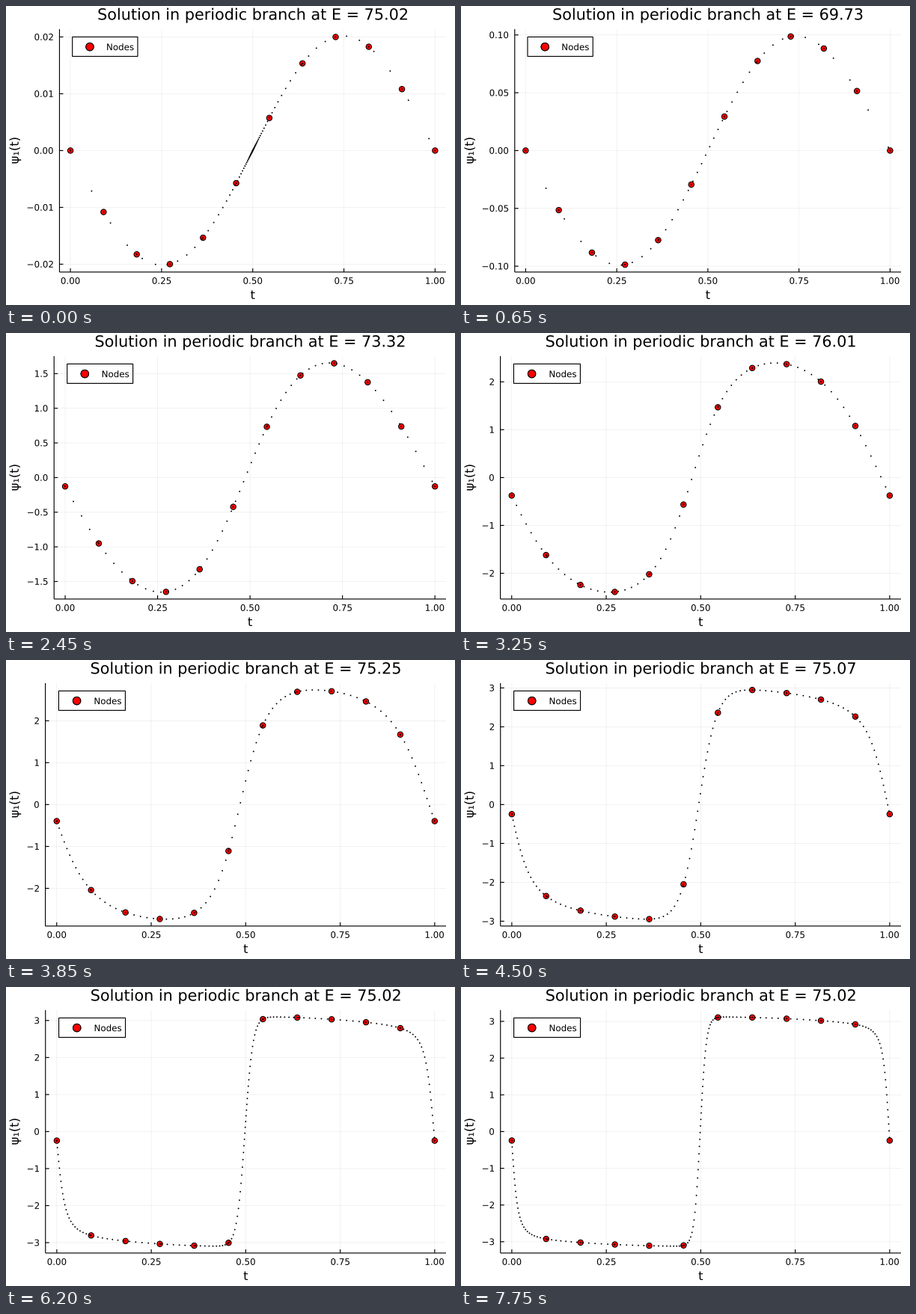
Animation, 600 px wide and 400 px high, one loop 7.8 s. Source, as a matplotlib script:

```python
import numpy as np
import matplotlib.pyplot as plt
from matplotlib.animation import FuncAnimation
from matplotlib.collections import LineCollection
from matplotlib.patches import PathPatch, Rectangle
from matplotlib.textpath import TextPath
from matplotlib.transforms import Affine2D

plt.rcParams["font.family"] = "DejaVu Sans"

W, H, FRAMES = 600, 400, 156
PT = 0.72                                  # points per pixel at 100 dpi
RIGHT, TOP, BOTTOM = 588.0, 30.9, 355.9
MID = (TOP + BOTTOM) / 2
SMALL, LABEL, TITLE = 11.87, 16.3, 20.76   # font sizes in pixels
NODES = np.arange(12) / 11
GRID = np.linspace(0, 1, 6001)

# frame: amplitude, start steepness, plateau tilt, middle steepness,
#        tanh share, phase shift, point clustering in the middle, at the ends
POSES = {
    0:   (0.02017, 1.00, 0.000, 1.02, 0, 0.0000, 0.004, 5.000),
    13:  (0.0991, 1.04, 0.000, 1.15, 0, 0.0000, 0.085, 3.000),
    32:  (0.8130, 1.10, 0.000, 1.30, 0, 0.0014, 0.092, 0.600),
    65:  (2.3940, 1.88, 0.000, 2.80, 0, 0.0225, 0.085, 0.115),
    90:  (2.9470, 5.75, 0.160, 6.60, 1, 0.0054, 0.028, 0.027),
    124: (3.0950, 13.4, 0.105, 15.0, 1, 0.0021, 0.008, 0.0125),
    155: (3.1200, 18.6, 0.075, 20.0, 1, 0.00145, 0.0068, 0.008),
}
LOG = [0, 1, 3, 6, 7]                      # columns blended on a log scale
TIMES = np.array(list(POSES), float)
TABLE = np.array(list(POSES.values()))
TABLE[:, LOG] = np.log(TABLE[:, LOG])


def hermite(s, a, b, da, db):
    return (a + (b - a) * s * s * (3 - 2 * s)
            + da * s * (1 - s) ** 2 - db * s * s * (1 - s))


def tangents():
    d = np.diff(TABLE, axis=0) / np.diff(TIMES)[:, None]
    same = d[:-1] * d[1:] > 0
    total = np.where(same, d[:-1] + d[1:], 1)
    inner = np.where(same, 2 * d[:-1] * d[1:] / total, 0)
    return np.vstack([d[:1], inner, d[-1:] * 0.7])


SLOPES = tangents()


def pose(f):
    i = min(np.searchsorted(TIMES, f, side="right") - 1, len(TIMES) - 2)
    h = TIMES[i + 1] - TIMES[i]
    p = hermite((f - TIMES[i]) / h, TABLE[i], TABLE[i + 1],
                h * SLOPES[i], h * SLOPES[i + 1])
    p[LOG] = np.exp(p[LOG])
    return p


def energy(f):
    if f <= 32:
        return 69.12 + 5.9 * np.exp(-0.175 * f) + 0.009 * (f / 32) ** 2
    if f < 65:
        return hermite((f - 32) / 33, 69.15, 76.01, 0.7, -3.9)
    return 75.02 + 0.99 * np.exp(-0.12 * (f - 65))


def curve(t, p):
    amp, start, tilt, middle, share, shift = p[:6]

    def lobe(u):
        x = start * np.tan(np.pi * np.clip(u, 0, 0.499999))
        y = middle * np.tan(np.pi * np.clip(0.5 - u, 0, 0.499999))
        rise = x / np.hypot(1, x) * (1 - tilt * (1 - 2 * u) ** 2)
        return rise * ((1 - share) * y / np.hypot(1, y) + share * np.tanh(y))

    peak = lobe(np.linspace(0, 0.5, 1001)).max()
    w = (t + shift) % 1
    return amp / peak * np.where(w < 0.5, -lobe(w), lobe(1 - w))


def steps(p):
    """Solver steps: close together where the motion is fast."""
    mid, end = p[6:]
    v = np.abs(GRID - 0.5)
    rho = (1 / np.hypot(v, mid) + 1 / np.hypot(0.5 - v, end)) / 0.135
    s = np.concatenate([[0], np.cumsum((rho[1:] + rho[:-1]) / 2 * GRID[1])])
    return np.concatenate([np.interp(np.arange(int(s[-1]) + 1), s, GRID), NODES])


def y_ticks(limit):
    best, out = -1, None
    for z in range(-4, 2):
        for q, nice in ((1, 1), (5, 0.9), (2, 0.7), (2.5, 0.5), (3, 0.2)):
            step = q * 10.0 ** z
            k = int(limit / step)
            if k not in (2, 3):
                continue
            score = (1 - abs(2 * k - 4) / 5) / 4 + limit / (2 * k * step) + nice / 4
            if score > best:
                digits = max(0, -z + (q == 2.5))
                best, out = score, (step * np.arange(-k, k + 1), digits)
    return out


fig = plt.figure(figsize=(W / 100, H / 100), dpi=100, facecolor="white")
ax = fig.add_axes([0, 0, 1, 1])
ax.set(xlim=(0, W), ylim=(H, 0))
ax.axis("off")

outlines = {}


def outline(s, size):
    """Glyph outlines and their inked extent, cached."""
    if (s, size) not in outlines:
        path = TextPath((0, 0), s, size=size)
        outlines[s, size] = path, path.get_extents()
    return outlines[s, size]


class Label:
    """Text with its baseline at (x, y), placed to a fraction of a pixel."""

    def __init__(self, size, align=0.5, angle=0):
        self.size, self.align, self.angle = size, align, angle
        self.patch = ax.add_patch(PathPatch(outline("0", size)[0], fc="black",
                                            lw=0, zorder=6))

    def put(self, s, x, y):
        path, ink = outline(s, self.size)
        move = Affine2D().translate(-ink.x0 - self.align * ink.width, 0)
        move.scale(1, -1).rotate_deg(self.angle).translate(x, y)
        self.patch.set_path(move.transform_path(path))


def lines(width, z, **kw):
    c = LineCollection([], colors="black", linewidths=width * PT, zorder=z, **kw)
    c.set_snap(False)
    return ax.add_collection(c, autolim=False)


def discs(n, d, z, **kw):
    return ax.scatter(np.zeros(n), np.zeros(n), s=np.full(n, (d * PT) ** 2),
                      zorder=z, **kw)


red = dict(facecolors="red", edgecolors="black", linewidths=1.0 * PT)
grid = lines(0.7, 1, alpha=0.075)
axes = lines(1.15, 2)
nodes = discs(12, 7.4, 3, **red)
dots = discs(1, 1.9, 4, facecolors="black", linewidths=0)
box = ax.add_patch(Rectangle((0, 41.4), 1, 26, fc="white", ec="black",
                             lw=1.15 * PT, zorder=5, snap=False))
key = discs(2, 10.4, 6, **red)
key_text = Label(SMALL, align=0)
title = Label(TITLE)
x_label = Label(LABEL)
Label(LABEL, angle=-90).put("ψ₁(t)", 16.8, MID)
x_marks = np.arange(5) / 4
x_texts = [Label(SMALL) for _ in x_marks]
y_texts = [Label(SMALL, align=1) for _ in range(7)]


def draw(f):
    p = pose(f)
    amp = p[0]
    marks, digits = y_ticks(1.06 * amp)
    names = [f"{abs(v):.{digits}f}" for v in marks]
    names = ["−" + s if v < -1e-9 else s for s, v in zip(names, marks)]
    left = 37.45 + max(outline(s, SMALL)[1].width for s in names)
    width = RIGHT - left

    def px(t):
        return left + width * (t + 0.03) / 1.06

    def py(v):
        return MID - v / (1.06 * amp) * (BOTTOM - TOP) / 2

    def place(item, t):
        item.set_offsets(np.column_stack([px(t), py(curve(t, p))]))

    t = steps(p)
    place(nodes, NODES)
    place(dots, t)
    dots.set_sizes(np.full(len(t), (1.9 * PT) ** 2))

    xs, ys = px(x_marks), py(marks)
    grid.set_segments([[(x, TOP), (x, BOTTOM)] for x in xs]
                      + [[(left, y), (RIGHT, y)] for y in ys])
    axes.set_segments([[(left, BOTTOM), (RIGHT, BOTTOM)], [(left, BOTTOM), (left, TOP)]]
                      + [[(x, BOTTOM), (x, BOTTOM - 5)] for x in xs]
                      + [[(left, y), (left + 5, y)] for y in ys])

    for item, v, x in zip(x_texts, x_marks, xs):
        item.put(f"{v:.2f}", x, 371.8)
    for i, item in enumerate(y_texts):
        item.patch.set_visible(i < len(ys))
        if i < len(ys):
            item.put(names[i], left - 8.7, ys[i] + 0.365 * SMALL)

    edge = left + width / 30
    box.set_x(edge)
    box.set_width(40.8 + 0.09 * width)
    key.set_offsets([(edge + 0.0451 * width, 54.6)] * 2)
    key_text.put("Nodes", edge + 0.088 * width + 1, 59.1)
    center = (left + RIGHT) / 2
    x_label.put("t", center, 392)
    title.put(f"Solution in periodic branch at E = {energy(f):.2f}", center, 18.4)
    return []


anim = FuncAnimation(fig, draw, frames=FRAMES, init_func=lambda: draw(0),
                     interval=50, repeat=True, repeat_delay=0, blit=False)
plt.show()
```
